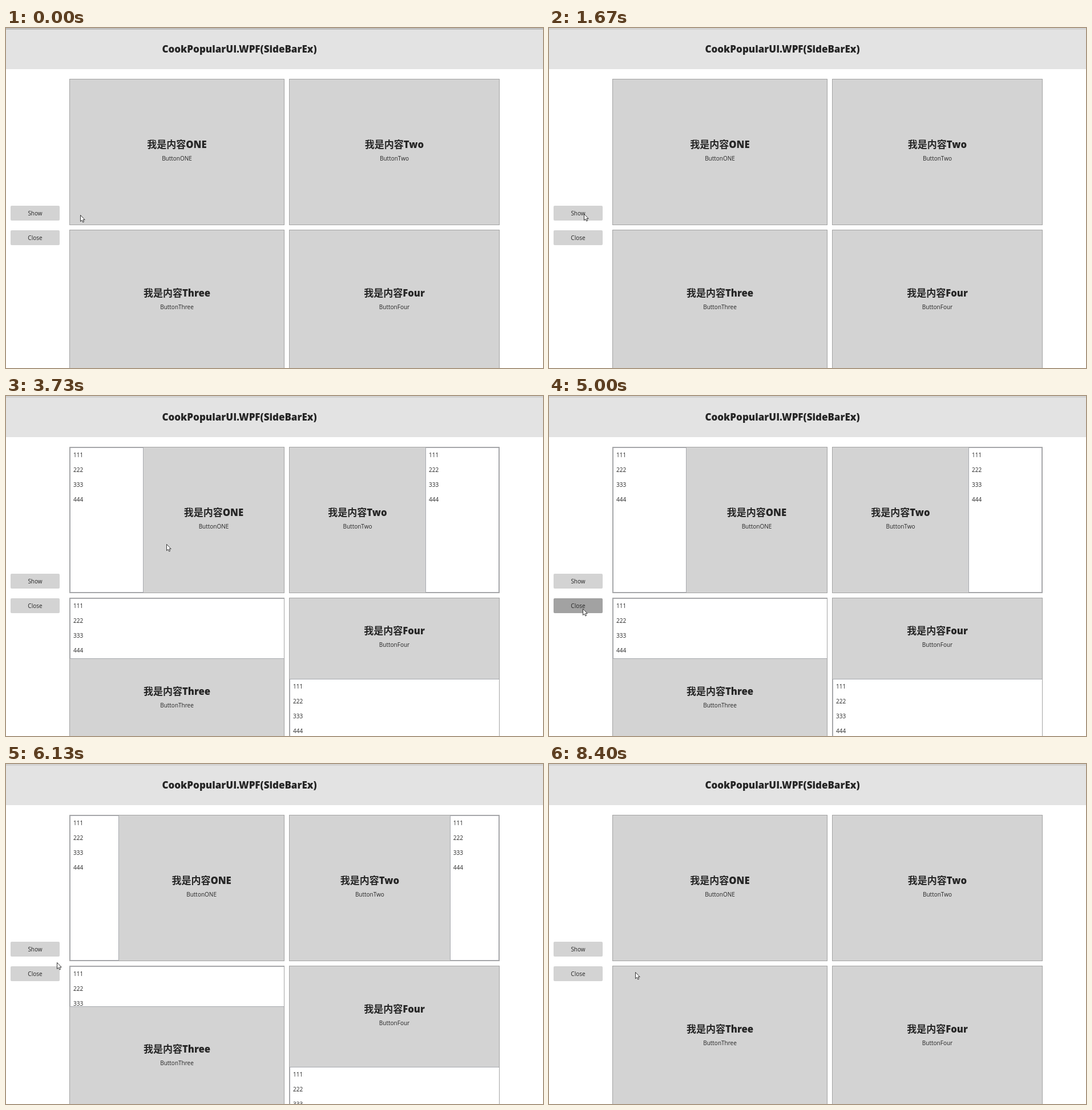
Recreate the animation shown at these times as an HTML page. Size 941x595 px, loop 8470 ms.

```html
<!DOCTYPE html>
<html lang="zh">
<head>
<meta charset="utf-8">
<title>SideBarEx</title>
<style>
  html, body { margin: 0; width: 100%; height: 100%; overflow: hidden; background: #fff; }
  body { position: relative; color: #262626; font: 10px/26px "Open Sans", "Noto Sans", sans-serif; }
  div { position: absolute; box-sizing: border-box; white-space: nowrap; }
  h1, h2, p { margin: 0; }
  h1, h2 { font-size: 17px; font-weight: 800; }
  h2, p { line-height: 24px; }
  h2 { font-size: 16.7px; }
  h2 span { font: 700 17px/24px "Noto Sans CJK SC", "Noto Sans CJK", sans-serif; }
  #bar { left: 0; top: 0; width: 100%; height: 3px; }
  #header { left: 0; top: 3px; width: 100%; height: 69px; background: #e3e3e3; }
  h1 { width: 818px; line-height: 68px; text-align: center; }
  .button { left: 8px; width: 86px; height: 26px; border-radius: 2px; text-align: center; }
  .panel { background: #d3d3d3; border: 1px solid #a3a3a3; overflow: hidden; }
  .content { inset: 0; display: flex; flex-direction: column; align-items: center; justify-content: center; padding-bottom: 4px; }
  .drawer { background: #fff; border: 1px solid #a9abb0; overflow: hidden; padding-left: 5px; }
  .drawer div { margin-top: -1px; }
  .left { inset: 0 auto 0 0; }
  .right { inset: 0 0 0 auto; }
  .top { inset: 0 -1px auto 0; }
  .bottom { inset: auto -1px 0 0; }
  svg { position: absolute; left: 0; top: 0; overflow: visible; }
</style>
</head>
<body>
<div id="bar"></div>
<div id="header"><h1>CookPopularUI.WPF(SideBarEx)</h1></div>
<div id="show" class="button" style="top:311px">Show</div>
<div id="close" class="button" style="top:354px">Close</div>
<svg id="cursor" width="10" height="15">
  <path d="M.5 .5V11.6L3 9.3 4.8 13 6.6 12.2 4.9 8.6H8.2Z" fill="#fff" stroke="#222" stroke-width=".9"/>
</svg>
<script>
const LOOP = 8470, STEP = 1000 / 15, SLIDE = 400;
const byId = id => document.getElementById(id);
const cursor = byId('cursor');
const columns = [{ x: 111, w: 377 }, { x: 496, w: 369 }];
const rows = [{ y: 89, h: 256 }, { y: 353, h: 249 }];

// Each panel has a drawer docked to one side that pushes the content away.
function makePanel([name, side], i) {
  const { x, w } = columns[i % 2], { y, h } = rows[i >> 1];
  const [dimension, size] = i < 2 ? ['width', 129] : ['height', 106];
  const panel = document.createElement('div');
  panel.className = 'panel';
  panel.style.cssText = `left:${x}px;top:${y}px;width:${w}px;height:${h}px`;
  panel.innerHTML = `<div class="content"><h2><span>我是内容</span>${name}</h2><p>Button${name}</p></div>
    <div class="drawer ${side}"><div>111<br>222<br>333<br>444</div></div>`;
  document.body.insertBefore(panel, cursor);
  const [content, drawer] = panel.children;
  return open => {
    const extent = open * size + 'px';
    drawer.hidden = !open;
    drawer.style[dimension] = content.style[side] = extent;
  };
}

const panels = [['ONE', 'left'], ['Two', 'right'], ['Three', 'top'], ['Four', 'bottom']].map(makePanel);

const clicks = [
  { button: 'show', down: 1330, up: 1670, slide: 1800 },
  { button: 'close', down: 5000, up: 5200, slide: 5133 },
  { button: 'show', down: 5800, up: 5930, slide: 5870 },
  { button: 'close', down: 7530, up: 7800, slide: 7733 }
];

const start = { x: 130, y: 327 };
const moves = [
  { from: 70, to: 530, x: 176, y: 308 },
  { from: 530, to: 1070, x: 61, y: 325 },
  { from: 1800, to: 2400, x: 330, y: 257 },
  { from: 2730, to: 3130, x: 218, y: 287 },
  { from: 3200, to: 4000, x: 302, y: 250 },
  { from: 4400, to: 4800, x: 59, y: 372 },
  { from: 5200, to: 5600, x: 65, y: 330 },
  { from: 5930, to: 6400, x: 124, y: 372 },
  { from: 6800, to: 7330, x: 64, y: 368 },
  { from: 7800, to: 8400, x: 151, y: 364 }
];

const ramp = (t, from, to) => Math.min(1, Math.max(0, (t - from) / (to - from)));
const smooth = k => k * k * (3 - 2 * k);

function cursorAt(t) {
  return moves.reduce((p, move) => {
    const k = smooth(ramp(t, move.from, move.to));
    return { x: p.x + (move.x - p.x) * k, y: p.y + (move.y - p.y) * k };
  }, start);
}

function openAt(t) {
  return clicks.reduce((open, { button, slide }) =>
    open + (button === 'show' ? 1 : -1) * ramp(t, slide, slide + SLIDE), 0);
}

function draw(now) {
  // The small offset absorbs rounding at the 15 fps steps.
  const t = Math.floor((now % LOOP + 4) / STEP) * STEP + 4;
  const { x, y } = cursorAt(t);
  const pressed = clicks.find(click => t >= click.down && t < click.up);
  panels.forEach(setOpen => setOpen(openAt(t)));
  byId('bar').style.background = t < clicks[0].down ? '#bfbfbf' : '#d3d3d3';
  for (const id of ['show', 'close'])
    byId(id).style.background = pressed?.button === id ? '#a2a2a2' : '#d3d3d3';
  cursor.style.transform = `translate(${Math.round(x)}px, ${Math.round(y)}px)`;
  requestAnimationFrame(draw);
}
requestAnimationFrame(draw);
</script>
</body>
</html>
```
